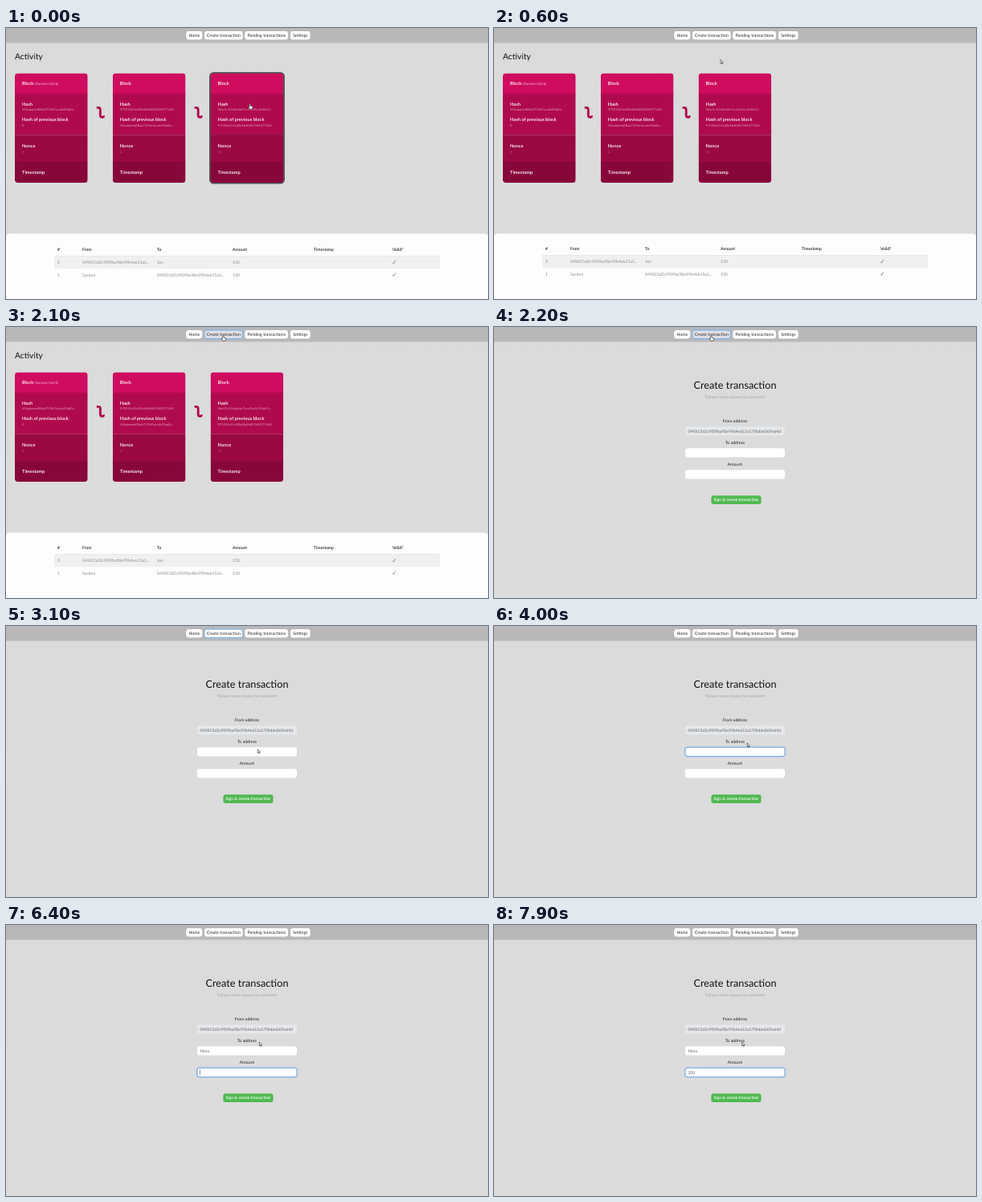
Write an HTML page that moves like this. It is 600x338 px and loops after 8000 ms.

```html
<!DOCTYPE html>
<html lang="en">
<head>
<meta charset="utf-8">
<title>Block explorer</title>
<style>
  html, body { margin: 0; width: 100%; height: 100%; overflow: hidden; background: #dcdcdc; }
  svg { display: block; width: 100vw; height: 100vh; }
  text { font-family: Lato, "Open Sans", sans-serif; font-size: 5.2px; fill: #222; text-rendering: geometricPrecision; }
  .semi { font-weight: 600; }
  .mid { text-anchor: middle; }
  .card { font-size: 5.75px; font-weight: 600; fill: #fff; }
  .small { font-size: 4.05px; fill: #fff; fill-opacity: .58; }
  .faint { font-size: 4.05px; fill: #fff; fill-opacity: .34; }
  .cell { fill: #8b8b8b; font-size: 5.15px; }
  .field { fill: #62686f; font-size: 5.1px; }
</style>
</head>
<body>
<svg id="stage" viewBox="0 0 600 338" preserveAspectRatio="none">
  <defs>
    <clipPath id="cardClip"><rect width="90.7" height="136.5" rx="4"/></clipPath>
    <clipPath id="fromClip"><rect x="240" y="124" width="119" height="13"/></clipPath>
    <linearGradient id="page" x2="0" y2="1">
      <stop stop-color="#dadada"/><stop offset=".5" stop-color="#dcdcdc"/><stop offset="1" stop-color="#dbdbdb"/>
    </linearGradient>
  </defs>
  <rect width="600" height="338" fill="url(#page)"/>
  <rect width="600" height="18.5" fill="#bab7b9"/>
  <g id="nav"></g>
  <g id="activity"></g>
  <g id="form"></g>
  <g id="cursor"></g>
</svg>
<script>
const LOOP = 8000;
const NS = 'http://www.w3.org/2000/svg';
const byId = id => document.getElementById(id);

function add(parent, tag, attrs, content) {
  const node = document.createElementNS(NS, tag);
  for (const key in attrs) node.setAttribute(key, attrs[key]);
  if (content !== undefined) node.textContent = content;
  return parent.appendChild(node);
}
const box = (parent, x, y, width, height, fill, rx = 0, more = {}) =>
  add(parent, 'rect', { x, y, width, height, fill, rx, ...more });
const label = (parent, x, y, content, cls = '', more = {}) =>
  add(parent, 'text', { x, y, class: cls, ...more }, content);
const show = (node, on) => node.setAttribute('display', on ? 'inline' : 'none');

function focusRing(parent, x, y, w, h) {
  const g = add(parent, 'g', {});
  box(g, x - .5, y - .5, w + 1, h + 1, 'none', 3.4, { stroke: '#9cc3ee', 'stroke-width': 2, 'stroke-opacity': .55 });
  box(g, x, y, w, h, 'none', 3, { stroke: '#71a6df', 'stroke-width': .8 });
  return g;
}

// Navigation
const nav = byId('nav');
const navButtons = [['Home', 224.3, 20], ['Create transaction', 247, 47.7],
  ['Pending transactions', 297.3, 53.8], ['Settings', 354, 24.7]].map(([name, x, w]) => {
  const rect = box(nav, x, 4, w, 10.6, '#fff', 3);
  label(nav, x + w / 2, 11.1, name, 'mid');
  return rect;
});
const navRing = focusRing(nav, 247, 4, 47.7, 10.6);

// Activity page
const activity = byId('activity');
label(activity, 11, 39, 'Activity', '', { style: 'font-size:10.3px;fill:#111' });

const hashes = ['44babaeed08ab757b45acab49bb0c...', '975944e12e28a8b68d03348377460', '0da31c534dacbb7cca1bd1c32db14...'];
const nonces = ['0', '2', '14'];
const bands = [[0, 25.5, '#cf0c5e'], [25.5, 51.5, '#b00a4e'], [77, 33.5, '#9a0843'], [110.5, 26, '#88073b']];
const hoverRing = box(activity, 254, 56, 92, 137.5, '#565458', 4.5, { stroke: '#565458', 'stroke-width': 2 });

hashes.forEach((hash, i) => {
  const g = add(activity, 'g', { transform: `translate(${11 + i * 121.8} 56.4)` });
  const body = add(g, 'g', { 'clip-path': 'url(#cardClip)' });
  bands.forEach(([y, h, fill]) => box(body, 0, y, 90.7, h + .1, fill));
  label(g, 9, 14.8, 'Block', 'card');
  if (!i) label(g, 24.6, 14.6, '(Genesis block)', 'small', { style: 'font-size:4.5px;fill-opacity:.7' });
  label(g, 9, 40.6, 'Hash', 'card');
  label(g, 9, 46.8, hash, 'small');
  label(g, 9, 59.3, 'Hash of previous block', 'card');
  label(g, 9, 66.2, i ? hashes[i - 1] : '0', 'small');
  label(g, 9, 92.3, 'Nonce', 'card');
  label(g, 9, 99.2, nonces[i], 'faint');
  label(g, 9, 125.6, 'Timestamp', 'card');
  if (i < 2) add(g, 'path', {
    d: 'M101.8 43h2.2q2.4 0 2.4 2.6v6.8q0 2.6 2.2 2.6 2 0 2-2.2',
    fill: 'none', stroke: '#b00a4e', 'stroke-width': 2.9, 'stroke-linejoin': 'round'
  });
});

add(activity, 'path', { d: 'M0 338V261q0-4.5 4.5-4.5H595.500q4.500 0 4.500 4.500V338z', fill: '#fdfdfd' });
const table = add(activity, 'g', {});
const columns = [64, 95, 188, 282, 383, 481];
const sender = '049815d3c9f09ba98e99b4e615a1...';
box(table, 60, 283.7, 480, 15.6, '#f0f0f0');
box(table, 60, 283.4, 480, .6, '#dedede');
['#', 'From', 'To', 'Amount', 'Timestamp', 'Valid?'].forEach((name, i) =>
  label(table, columns[i], 277.3, name, 'semi', { style: 'font-size:5.1px' }));
[['0', sender, 'Jon', '150'], ['1', 'System', sender, '100']].forEach((row, r) => {
  const y = 293.2 + r * 15.4;
  row.forEach((value, i) => label(table, columns[i], y, value, 'cell'));
  add(table, 'path', { d: `M481.300 ${y - 1.6}l1.100 1.500 2.400-4`, fill: 'none', stroke: '#666', 'stroke-width': .7 });
});

// Transaction form
const form = byId('form');
label(form, 300, 77.4, 'Create transaction', 'mid', { style: 'font-size:12.75px;fill:#111' });
label(form, 300, 88.5, 'Transer some money to someone!', 'mid', { style: 'fill:#a2a2a2;font-size:5.1px' });
['From address', 'To address', 'Amount'].forEach((name, i) => {
  label(form, 300, 119.4 + i * 27, name, 'mid');
  box(form, 238, 124.3 + i * 27, 124, 11.2, i ? '#fff' : '#e5e7e9', 3);
});
label(form, 241.4, 131.6, '049815d3c9f09ba98e99b4e615a17f8dde069e64d', 'field', { 'clip-path': 'url(#fromClip)' });
const fields = [151.3, 178.3].map(y => ({
  ring: focusRing(form, 238, y, 124, 11.2),
  text: label(form, 241.4, y + 7.3, '', 'field'),
  caret: box(form, 241.4, y + 2.2, .6, 7, '#555')
}));
box(form, 270.4, 210.2, 62.2, 10.8, '#50b951', 3);
label(form, 301.5, 217.3, 'Sign & create transaction', 'mid semi', { style: 'fill:#fff;font-size:5.05px' });

// Cursors, both with the tip at the origin
const cursor = byId('cursor');
const outline = { fill: '#fff', stroke: '#222', 'stroke-width': .6, 'stroke-linejoin': 'round' };
const hand = add(cursor, 'path', {
  d: 'M-.7 .6Q0-.4 .7 .6V2.900L3 3.400Q3.700 3.700 3.500 4.800L2.900 7H-.6L-2.400 4.500Q-2.300 3.500-.7 4.500z', ...outline
});
const arrow = add(cursor, 'path', { d: 'M0 0V4.800L1.100 3.800 1.900 5.500 2.700 5.100 1.900 3.500H3.300z', ...outline });

// Cursor stops: time, x, y
const path = [[0, 303.7, 94.2], [150, 303.7, 94.2], [900, 270.3, 10.2], [2500, 270.3, 10.2],
  [3150, 314, 156], [3350, 314, 156], [3650, 315.3, 146], [7350, 315.3, 146], [7800, 308.8, 146]];

function cursorAt(t) {
  const next = path.findIndex(p => p[0] > t);
  if (next < 0) return path[path.length - 1].slice(1);
  const [t0, x0, y0] = path[next - 1], [t1, x1, y1] = path[next];
  const u = (t - t0) / (t1 - t0), e = u * u * (3 - 2 * u);
  return [x0 + (x1 - x0) * e, y0 + (y1 - y0) * e];
}

const inputs = [
  { value: 'Mom', focus: 3300, blur: 5300, keys: [4500, 4700, 4900] },
  { value: '200', focus: 5300, blur: LOOP, keys: [6800, 7000, 7200] }
];

function drawField(field, input, t) {
  const pressed = input.keys.filter(k => k <= t);
  const focused = t >= input.focus && t < input.blur;
  const since = t - (pressed.length ? pressed[pressed.length - 1] : input.focus);
  field.text.textContent = input.value.slice(0, pressed.length);
  show(field.ring, focused);
  show(field.caret, focused && since % 1000 < 500);
  const width = pressed.length ? field.text.getComputedTextLength() : 0;
  field.caret.setAttribute('x', 241.4 + width);
}

function draw(t) {
  const [x, y] = cursorAt(t);
  const onForm = t >= 2200;
  const onCard = !onForm && x > 254 && x < 346 && y > 56 && y < 193;
  const onNav = y > 4 && y < 14.6 && x > 247 && x < 294.7;
  const navFocus = t >= 2000 && t < 3300;

  show(activity, !onForm);
  show(form, onForm);
  show(hoverRing, onCard);
  show(navRing, navFocus);
  navButtons[1].setAttribute('fill', onNav ? (navFocus ? '#dcdfe3' : '#e8e8e9') : '#fff');
  const settle = 1 - Math.min(1, Math.max(0, (t - 100) / 300));
  table.setAttribute('transform', `translate(0 ${settle})`);

  fields.forEach((field, i) => drawField(field, inputs[i], t));
  show(hand, onCard || onNav);
  show(arrow, !(onCard || onNav));
  cursor.setAttribute('transform', `translate(${x} ${y})`);
}

const start = performance.now();
function tick() {
  draw((performance.now() - start) % LOOP);
  requestAnimationFrame(tick);
}
tick();
</script>
</body>
</html>
```
